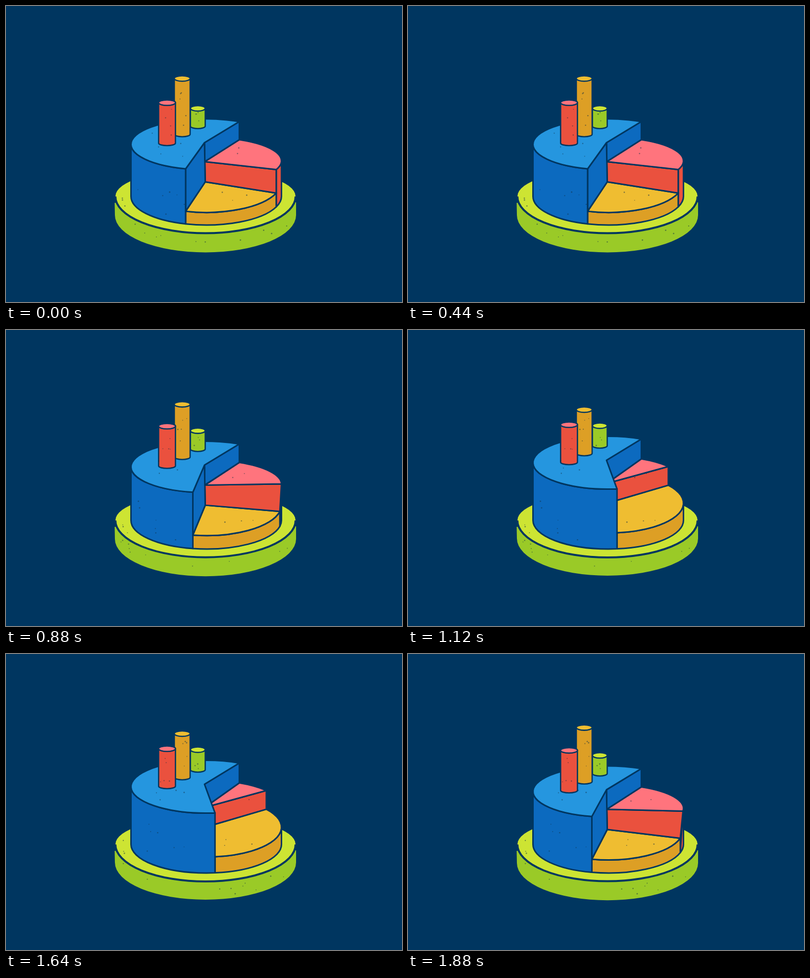
Animation, 800 px wide and 600 px high, one loop 1.92 s. Source, as an HTML page with a canvas:

```html
<!DOCTYPE html>
<html>
<head>
<meta charset="utf-8">
<title>Pie chart cake</title>
<style>
html, body { margin: 0; height: 100%; overflow: hidden; background: #003660; }
canvas { display: block; }
</style>
</head>
<body>
<canvas id="stage" width="800" height="600"></canvas>
<script>
const g = document.getElementById('stage').getContext('2d');
const NAVY = '#003660', LOOP = 1920, STEP = 40, SPECK_TIME = 640;
const CX = 404.5, R = 152, RAD = Math.PI / 180;
const BACK = -63.9 * RAD, LEFT = Math.PI;

const mix = (a, b, p) => a + (b - a) * p;
const ease = u => (1 - Math.cos(Math.PI * Math.min(1, Math.max(0, u)))) / 2;

function face(color, draw, width = 3) {
  g.beginPath();
  draw();
  g.closePath();
  g.fillStyle = color;
  g.fill();
  g.lineWidth = width;
  g.stroke();
}

const poly = (color, ...pts) => face(color, () => pts.forEach(p => g.lineTo(...p)));
const arc = (level, a, b, ccw = false) => g.ellipse(CX, level.y, R, level.ry, 0, a, b, ccw);
const rim = (level, a) => [CX + R * Math.cos(a), level.y + level.ry * Math.sin(a)];

function side(color, top, bottom, a, b, bottomEnd = b) {
  face(color, () => { arc(top, a, b, b < a); arc(bottom, bottomEnd, a, true); });
}

function slice(color, level, a, b) {
  face(color, () => { g.moveTo(...level.apex); arc(level, a, b); });
}

function plate(p) {
  const lip = mix(74.5, 75, p);
  g.fillStyle = '#9aca27';
  g.beginPath();
  g.moveTo(219.5, 399);
  g.lineTo(220, 424);
  g.ellipse(403, mix(424, 422.5, p), 183, 75.5, 0, LEFT, 0, true);
  g.lineTo(586, 398);
  g.fill();
  g.fillStyle = '#cde433';
  g.beginPath();
  g.ellipse(403, 386, 182, 56, 0, LEFT, 0);
  g.ellipse(403, 386, 182, lip, 0, 0, LEFT);
  g.fill();
  g.lineWidth = 4;
  g.beginPath();
  g.ellipse(403, 386, 182, lip, 0, 0, LEFT);
  g.stroke();
}

function candle(x, r, top, bottom, bodyColor, capColor) {
  face(bodyColor, () => {
    g.ellipse(x, top, r, 5.5, 0, LEFT, 0);
    g.ellipse(x, bottom, r, 5, 0, 0, LEFT);
  }, 2.6);
  face(capColor, () => g.ellipse(x, top, r, 5.5, 0, 0, 7), 2.6);
}

function cake(p) {
  const front = mix(105.9, 83.3, p) * RAD;
  // The upper end of the cut swings ahead of its lower end.
  const cutTop = mix(21.5, -37, p ** .7) * RAD, cutLow = mix(21.5, -37, p ** 1.3) * RAD;
  const base = { y: 386, ry: 58 };
  const blue = { y: mix(280.5, 269, p), ry: mix(51.5, 53.5, p), apex: [401, mix(277, 264, p)] };
  const pink = { y: mix(314, 308, p), ry: mix(48, 52, p), apex: [401.5, mix(315.5, 311, p)] };
  const gold = { y: mix(356.5, 351, p), ry: mix(62, 60.5, p), apex: [402.5, mix(356.5, 351, p)] };

  if (cutLow > 0) side('#ea513e', pink, base, 0, cutTop, cutLow);
  side('#dd9f25', gold, base, Math.max(cutLow, 0), front);
  slice('#efbd31', gold, cutLow, front);
  poly('#ea513e', pink.apex, rim(pink, cutTop), rim(gold, cutLow), gold.apex);
  slice('#ff747d', pink, BACK, cutTop);
  poly('#0c6abf', blue.apex, rim(blue, BACK), rim(pink, BACK), pink.apex);
  if (rim(blue, front)[0] < blue.apex[0])
    poly('#0c6abf', blue.apex, rim(blue, front), rim(gold, front), gold.apex);
  side('#0c6abf', blue, base, front, LEFT);
  slice('#2596df', blue, front, BACK + 2 * Math.PI);

  candle(387.5, 15, mix(207.5, 194, p), mix(243.5, 234.5, p), '#9aca27', '#cde433');
  candle(356, 16, mix(147, 161.5, p), mix(260, 250, p), '#dd9f25', '#efbd31');
  candle(325.3, 17, mix(196, 192, p), mix(278, 268, p), '#ea513e', '#ff747d');
}

// Repeatable speckles, a new layout for each seed.
function sprinkle(seed) {
  let s = seed * 7919 + 17;
  const rnd = (a, b) => mix(a, b, (s = s * 16807 % 2147483647) / 2147483647);
  const scatter = (n, place) => {
    while (n--) {
      g.beginPath();
      g.arc(...place(), rnd(.8, 1.5), 0, 7);
      g.fill();
    }
  };
  const box = (x, y, w, h) => () => [rnd(x, x + w), rnd(y, y + h)];
  const wall = (rx, y, ry, from, to, depth) => () => {
    const a = rnd(from, to) * RAD;
    return [403 + rx * Math.cos(a), y + ry * Math.sin(a) + rnd(0, depth)];
  };
  g.fillStyle = 'rgba(20,50,70,.5)';
  scatter(10, wall(180, 396, 74, 15, 165, 22));   // plate edge
  scatter(3, wall(168, 386, 65, 155, 190, 4));    // plate top
  scatter(6, wall(146, 305, 52, 105, 170, 75));   // blue wall
  scatter(5, box(285, 255, 85, 50));              // blue top
  scatter(4, box(314, 206, 22, 60));              // red candle
  scatter(5, box(346, 172, 20, 72));              // yellow candle
  scatter(3, box(379, 215, 16, 20));              // green candle
  scatter(2, box(450, 285, 45, 15));              // pink slice
  scatter(3, box(430, 375, 70, 20));              // yellow slice
}

function frame() {
  const t = Math.floor(performance.now() % LOOP / STEP) * STEP;
  const p = ease((t - 760) / 360) - ease((t - 1640) / 320);
  g.fillStyle = g.strokeStyle = NAVY;
  g.lineJoin = 'round';
  g.fillRect(0, 0, 800, 600);
  plate(p);
  cake(p);
  sprinkle(1 + Math.floor(t / SPECK_TIME));
  requestAnimationFrame(frame);
}
frame();
</script>
</body>
</html>
```
